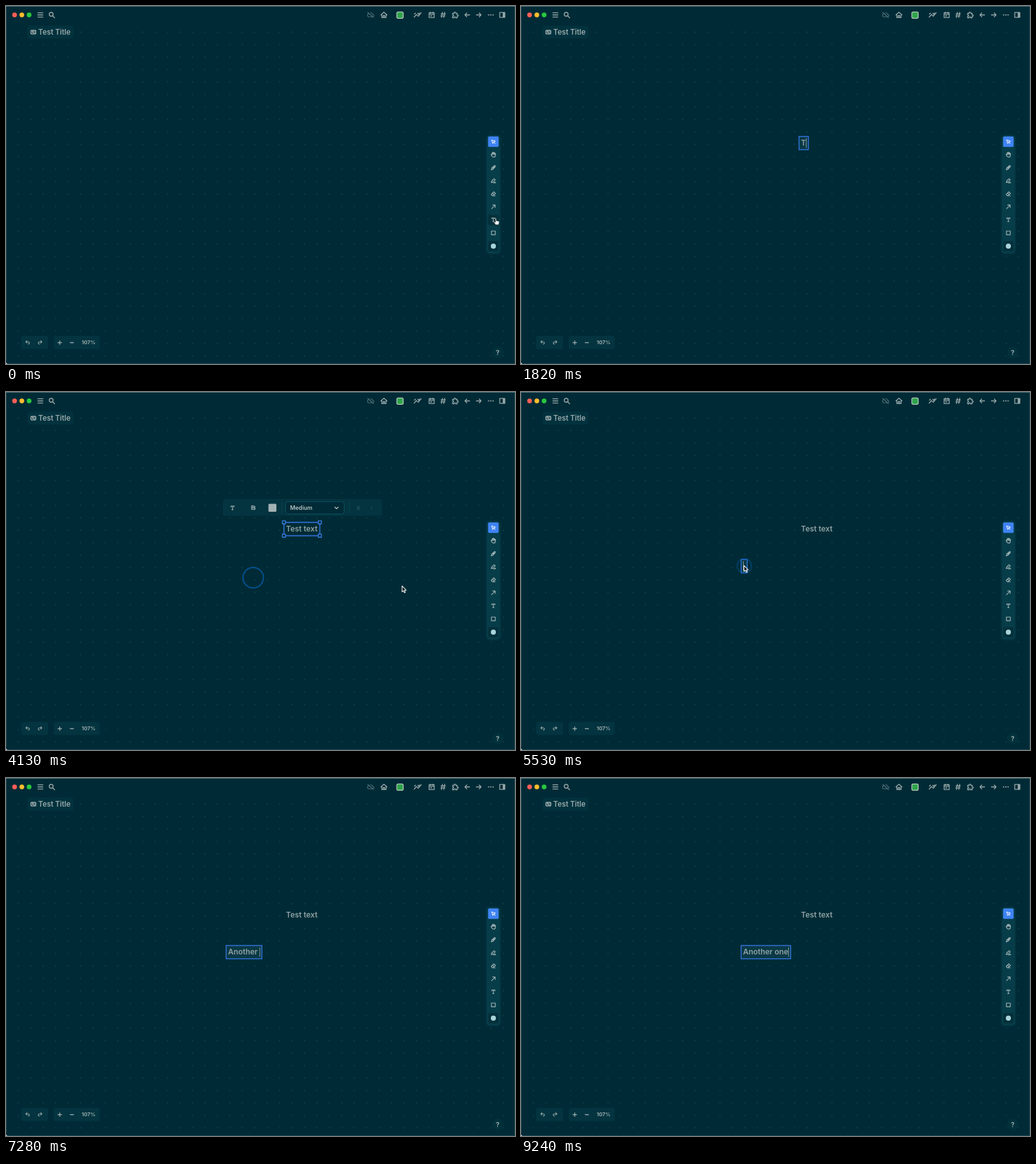
Write an HTML page with a canvas that moves like this. It is 800 px wide and 562 px high and loops after 9310 ms.

```html
<!DOCTYPE html>
<html lang="en">
<head>
<meta charset="utf-8">
<title>Whiteboard text</title>
<style>
html, body { margin: 0; width: 100%; height: 100%; overflow: hidden; background: #002b36; }
canvas { display: block; width: 800px; height: 562px; }
</style>
</head>
<body>
<canvas id="stage"></canvas>
<script>
const W = 800, H = 562, LOOP = 9310, STEP = 70;
const BG = '#002b36', PANEL = '#03343f', INK = '#98a9ab', BLUE = '#2f72d8';
const canvas = document.getElementById('stage');
const ctx = canvas.getContext('2d');
const scale = window.devicePixelRatio || 1;
canvas.width = W * scale;
canvas.height = H * scale;

function box(x, y, w, h, r, fill, stroke, line = 1) {
  ctx.beginPath();
  ctx.roundRect(x, y, w, h, r);
  if (fill) { ctx.fillStyle = fill; ctx.fill(); }
  if (stroke) { ctx.strokeStyle = stroke; ctx.lineWidth = line; ctx.stroke(); }
}

function disc(x, y, r, fill) {
  ctx.beginPath();
  ctx.arc(x, y, r, 0, Math.PI * 2);
  ctx.fillStyle = fill;
  ctx.fill();
}

function label(s, x, y, size, weight, color, style = '') {
  ctx.font = `${style} ${weight} ${size}px Inter, sans-serif`;
  ctx.fillStyle = color;
  ctx.fillText(s, x, y);
}

// Icon paths are centred on 0,0.
function icon(d, x, y, color = INK, line = 1.3, fill = null) {
  const path = new Path2D(d);
  ctx.save();
  ctx.translate(x, y);
  ctx.lineCap = ctx.lineJoin = 'round';
  ctx.lineWidth = line;
  if (fill) { ctx.fillStyle = fill; ctx.fill(path); }
  ctx.strokeStyle = color;
  ctx.stroke(path);
  ctx.restore();
}

const ICONS = {
  menu: 'M-4-3.3H4M-4 0H4M-4 3.3H4',
  search: 'M2-1A3 3 0 1 1-4-1A3 3 0 1 1 2-1M1.3 1.3L4.4 4.4',
  cloudOff: 'M-4.5-4L4.5 4M-2-2.5C-5-2.5-6 3-2.5 3H2.5M0-3.2C2-3.6 3-2 3-.8C5-.8 5.8 1 4.6 2.4',
  home: 'M-4.8 0L0-4.3L4.8 0M-3.4-1V4H3.4V-1M-1.2 4V1H1.2V4',
  chart: 'M-5.5 3.5L-2-.5L1 2L5.5-3.5M-5 -1.2L-3.5-2.8M0-2.6L1.5-1L3-3',
  calendar: 'M-4-3.3H4V4.2H-4ZM-4-.8H4M-2-4.7V-2.5M2-4.7V-2.5M-1.6 1.5H0',
  hash: 'M-1-4L-2-0L-2.6 4M2.6-4L1 4M-3.2-1.5H3.5M-3.6 1.6H3',
  puzzle: 'M-4-2.5H-1.5C-2.6-5 1.6-5 .8-2.5H3V0C5.5-1 5.5 3 3 2V4.5H.6C1.2 2.4-2.4 2.4-1.6 4.5H-4V1.8C-2 2.4-2-.8-4-.2Z',
  left: 'M3.7 0H-3.7M-.8-3L-3.7 0L-.8 3',
  right: 'M-3.7 0H3.7M.8-3L3.7 0L.8 3',
  side: 'M-4-3.8H4V3.8H-4ZM1.4-3.8V3.8M2.7-3.5V3.5',
  undo: 'M-1-2.6L-3-.7L-1 1.2M-3-.7H1C3.4-.7 3.4 2.6 1 2.6',
  redo: 'M1-2.6L3-.7L1 1.2M3-.7H-1C-3.4-.7-3.4 2.6-1 2.6',
  plus: 'M-2.8 0H2.8M0-2.8V2.8',
  minus: 'M-2.6 0H2.6',
  select: 'M-2.7-2.7L3-.9L.6 .4L-.9 2.8ZM1 1L2.7 2.7',
  hand: 'M-2-.2V-2.4M-2-2.4C-2-3.6-.7-3.6-.7-2.4V-.6M-.7-3C-.7-4.2 .7-4.2 .7-3V-.6M.7-2.6C.7-3.6 2-3.6 2-2.4V-.4M2-1.6C2-2.6 3.2-2.6 3.2-1.5V1C3.2 4.3-1 4.5-2.2 2.3L-3.5 .3C-3.8-.7-2.6-1-2-.2',
  pencil: 'M-3.3 3.3L-2.4 .3L1.6-3.3C2.7-3.8 3.7-2.4 3-1.5L-.7 2.5ZM-1 1L1.6-1.7',
  marker: 'M-3.4 2.8L-2.4 .2L1.2-3.2L3-1.5L-.6 2ZM0 3.2H1.8L2.4 1.8L3.5 3.2',
  eraser: 'M-3.4 .8L.7-3L3.4-.4L-.6 3.1H-1.7ZM-1.4-1L1.4 1.5M-.6 3.2H3',
  arrow: 'M-2.8 2.8L2.7-2.7M-1-2.8H2.8V1',
  text: 'M-2.5-1.7V-2.8H2.5V-1.7M0-2.8V2.8M-1 2.8H1',
  square: 'M-3-2.9H3V2.9H-3Z',
  scaleMode: 'M-2.5-2.8V2.8H2.8V.3H-2.5M-2.5-2.5H0V0M1.5-2.5L2.8-1.2L1.5 0',
  chevron: 'M-2.6-1.3L0 1.3L2.6-1.3',
  pointer: 'M0 0V9.2L2.1 7.3L3.6 10.6L5.2 9.9L3.7 6.7H6.5Z',
  fist: 'M0 0C0-1.5 1.8-1.5 1.8 0V3.1L4.7 3.6C6.2 4 6.4 4.8 6.1 6.3L5.3 9.5H.7L-2.1 5.9C-2.6 4.6-1.1 4.2 0 5.4Z',
  cross: 'M-5 0H5M0-5V5'
};

const HEADER = [['home', 594], ['chart', 647], ['calendar', 669], ['hash', 687],
  ['puzzle', 706], ['left', 725], ['right', 743], ['side', 780]];
const TOOLS = ['select', 'hand', 'pencil', 'marker', 'eraser', 'arrow', 'text', 'square'];

const CLICKS = [[300, 769, 334], [1120, 440, 215], [4040, 388.5, 291.5], [4640, 769, 334], [5290, 351, 273]];
const [PICK_1, PLACE_1, COMMIT, PICK_2, PLACE_2] = CLICKS.map(c => c[0]);
const RIPPLE = 400;

// Cursor stops: time, x, y.
const PATH = [[0, 769, 334], [400, 769, 334], [1000, 440, 215], [3500, 440, 215], [3900, 388, 291],
  [4040, 388, 291], [4130, 622.5, 304.5], [4550, 769, 334], [4720, 769, 334], [5200, 350.5, 272.5], [LOOP, 350.5, 272.5]];

const FIRST = { text: 'Test text', x: 440, y: 215, open: PLACE_1, start: 1760, pace: 128 };
const SECOND = { text: 'Another one', x: 349, y: 273.2, open: PLACE_2, start: 6140, pace: 155 };

function cursorAt(t) {
  let i = 0;
  while (i < PATH.length - 2 && t >= PATH[i + 1][0]) i++;
  const [t0, x0, y0] = PATH[i], [t1, x1, y1] = PATH[i + 1];
  const p = 1 - Math.pow(1 - (t - t0) / (t1 - t0), 3);
  return [x0 + (x1 - x0) * p, y0 + (y1 - y0) * p];
}

function drawWindow() {
  ctx.fillStyle = '#dfe5e6';
  ctx.fillRect(0, 0, W, H);
  box(0, 0, W, H, [0, 0, 0, 4], BG);
  ctx.fillStyle = '#1d4c57';
  for (let y = 41; y < H; y += 19.55)
    for (let x = 19.5; x < W; x += 19.55) ctx.fillRect(x - .7, y - .7, 1.4, 1.4);
  ctx.fillStyle = '#56737a';
  ctx.fillRect(0, 0, W, 1);
  ctx.fillStyle = '#1f4853';
  ctx.fillRect(0, 1, 1, H - 6);
  ctx.fillRect(W - 1, 1, 1, H - 1);
  ctx.fillRect(4, H - 1, W - 4, 1);

  ['#ff5f57', '#febc2e', '#28c840'].forEach((c, i) => disc(13.5 + i * 11.4, 14, 3.7, c));
  icon(ICONS.menu, 54, 14);
  icon(ICONS.search, 72, 14, INK, 1.4);
  icon(ICONS.cloudOff, 573, 14, '#52717a', 1.1);
  for (const [name, x] of HEADER) icon(ICONS[name], x, 14);
  box(614.3, 9.3, 10, 10, 2, '#2fa44a', '#b4c9bd', 1.3);
  for (const dx of [-3.5, 0, 3.5]) disc(762 + dx, 14, 1.1, INK);

  box(34, 31, 72, 20, 4, '#02323d');
  box(38.5, 37.5, 9, 7, 1.5, INK);
  icon('M-2.5-1.2V1.5H-.4M0-1.2H2.3V1H1', 43, 41, BG, .9);
  label('Test Title', 50.8, 45.1, 11.4, 600, INK);

  box(24, 518, 42, 20.5, 3, PANEL);
  box(75, 518, 72, 20.5, 3, PANEL);
  icon(ICONS.undo, 34, 528, INK, 1.1);
  icon(ICONS.redo, 53.5, 528, INK, 1.1);
  icon(ICONS.plus, 84.5, 528.5);
  icon(ICONS.minus, 103.5, 528.5);
  label('107%', 119, 531.4, 8.1, 700, INK);
  disc(773, 544, 9, '#02313c');
  label('?', 770, 547.8, 10, 700, INK);
}

function drawTools(active, hover) {
  ctx.save();
  ctx.shadowColor = 'rgba(20,90,105,.5)';
  ctx.shadowBlur = 4 * scale;
  box(756, 203.5, 20, 184.5, 4, '#063d49');
  ctx.restore();
  TOOLS.forEach((name, i) => {
    const y = 213 + i * 20.45, on = name === active;
    if (on) box(757.7, y - 8.2, 16.6, 16.4, 2, '#3f83f3');
    else if (name === hover) box(757.7, y - 8.2, 16.6, 16.4, 2, '#04303b');
    icon(ICONS[name], 766, y, on ? '#d5e4fb' : '#a0b3b5', 1.2);
  });
  box(758, 369, 16, 16, 2, '#04303b');
  disc(766, 377, 4, '#a9d3da');
}

function whiteboardText(s, item) {
  label(s, item.x, item.y + 4.2, 11.9, 600, '#8fa2a4');
  return ctx.measureText(s).width;
}

function drawText(item, t, editing) {
  if (t < item.open) return;
  const typed = Math.max(0, Math.min(item.text.length, Math.floor((t - item.start) / item.pace) + 1));
  const shown = item.text.slice(0, typed);
  if (!editing) {
    whiteboardText(shown, item);
    return;
  }
  const w = ctx.measureText(shown).width;
  ctx.font = '600 11.9px Inter, sans-serif';
  const frame = Math.max(9.5, ctx.measureText(shown).width + 6.8);
  box(item.x - 3, item.y - 10.3, frame, 20.8, 0, '#0b3946', BLUE, 1.5);
  const end = item.x + whiteboardText(shown, item);
  const lastKey = item.start + (item.text.length - 1) * item.pace;
  const hidden = t > lastKey && Math.floor((t - lastKey) / 530) % 2;
  if (!hidden) {
    ctx.fillStyle = '#879b9e';
    ctx.fillRect(end, item.y - 7.5, 1, 15);
  }
}

function drawSelection() {
  const w = whiteboardText(FIRST.text, FIRST) + 6.8;
  const x = FIRST.x - 3.2, y = FIRST.y - 10.4;
  box(x, y, w, 21, 0, null, BLUE, 1.6);
  for (const hx of [x, x + w])
    for (const hy of [y, y + 21]) box(hx - 2.4, hy - 2.4, 4.8, 4.8, 0, BG, '#3a80ea', 1.3);

  box(341, 168, 250, 26.5, 4, PANEL);
  icon(ICONS.text, 356, 182);
  icon(ICONS.scaleMode, 388.5, 181.5);
  box(412.5, 175.5, 12.5, 12.5, 1.5, '#a3b1b3');
  ctx.fillStyle = '#0a414d';
  ctx.fillRect(433, 173, 1, 17);
  ctx.fillRect(539, 173, 1, 17);
  box(439.5, 172, 92, 19.5, 4, BG, '#0d5060');
  label('Medium', 446.5, 185.1, 9, 600, '#b4c2c3');
  icon(ICONS.chevron, 519.5, 182, '#b4c2c3', 1.3);
  label('B', 551.5, 184.8, 7.5, 700, '#23525d');
  label('I', 573.5, 184.8, 7.5, 500, '#23525d', 'italic');
}

function drawRipples(t) {
  for (const [start, x, y] of CLICKS) {
    const p = (t - start) / RIPPLE;
    if (p < 0 || p >= 1) continue;
    ctx.beginPath();
    ctx.arc(x, y, 19 - 13 * p, 0, Math.PI * 2);
    ctx.strokeStyle = `rgba(8,98,190,${.9 * (1 - p)})`;
    ctx.lineWidth = 2;
    ctx.stroke();
  }
}

function drawCursor(t, tool) {
  if (t >= FIRST.start && t < 3500 || t >= SECOND.start) return;
  const [x, y] = cursorAt(t);
  if (x > 755) icon(ICONS.fist, x, y, '#20343a', .8, '#f4f6f6');
  else if (tool === 'text') icon(ICONS.cross, x, y, '#d8e0e0', 1);
  else icon(ICONS.pointer, x, y, '#e8eded', 1.1, '#0c1417');
}

function draw(t) {
  ctx.setTransform(scale, 0, 0, scale, 0, 0);
  const picking = t >= PICK_1 && t < PLACE_1 || t >= PICK_2 && t < PLACE_2;
  const tool = picking ? 'text' : 'select';
  drawWindow();
  drawTools(tool, cursorAt(t)[0] > 755 ? 'text' : null);
  if (t >= COMMIT && t < PICK_2) drawSelection();
  else drawText(FIRST, t, t < COMMIT);
  drawText(SECOND, t, true);
  drawRipples(t);
  drawCursor(t, tool);
}

const begin = performance.now();
function tick() {
  const t = (performance.now() - begin) % LOOP;
  draw(Math.floor(t / STEP) * STEP);
  requestAnimationFrame(tick);
}
tick();
</script>
</body>
</html>
```
